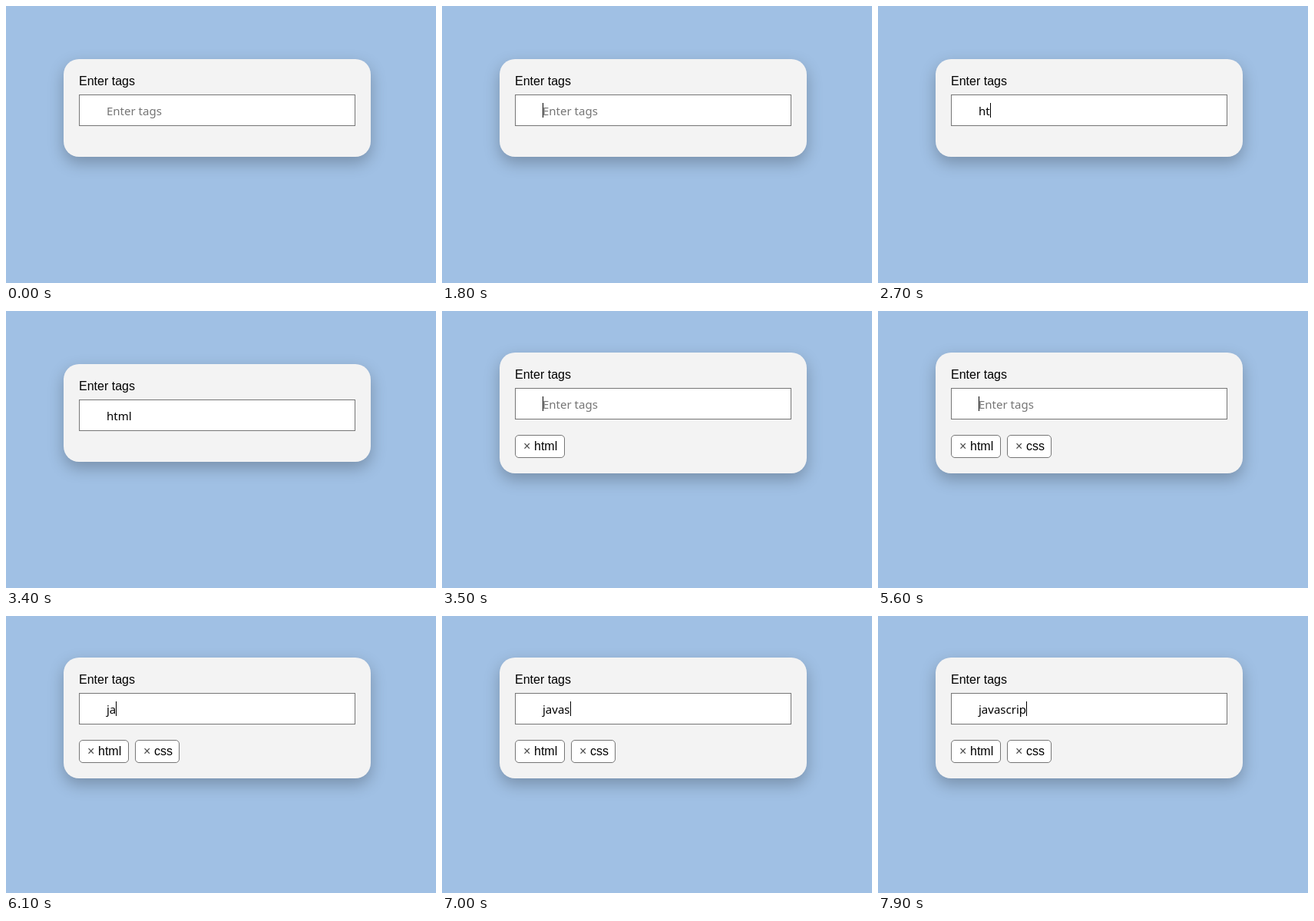
An HTML page that plays this animation: 560x360 px, repeating every 8 s.

```html
<!DOCTYPE html>
<html lang="en">
<head>
<meta charset="utf-8">
<title>Tag input</title>
<style>
  html, body { margin: 0; width: 100%; height: 100%; overflow: hidden; }
  body {
    position: relative;
    background: #a0c0e4;
    font: 16px/18px "Liberation Sans", Arial, sans-serif;
    color: #000;
  }
  .card, .card * { position: absolute; box-sizing: border-box; white-space: pre; }
  .card {
    left: 75px; top: 69px; width: 400px; height: 127px;
    border-radius: 20px;
    background: #f3f3f3;
    box-shadow: 0 8px 20px rgba(0, 0, 0, .25);
  }
  .card.tagged { top: 54px; height: 157px; }
  .label { left: 20px; top: 20px; }
  .field {
    left: 20px; top: 46px; width: 360px; height: 41px;
    border: 1px solid #767676;
    background: #fff;
    font: 15px/20px "Noto Sans", sans-serif;
  }
  .placeholder, .entry { left: 35px; top: 10px; }
  .placeholder { color: #757575; }
  .card .caret {
    position: static; display: inline-block; vertical-align: top;
    width: 1px; height: 19px; background: #000;
  }
  .card .typed { position: static; }
  .tag {
    top: 107px; height: 30px;
    border: 1px solid #767676; border-radius: 5px;
    background: #fff;
  }
  .tag i { left: 10px; top: 5px; font-style: normal; color: #444; }
  .tag b { left: 24px; top: 5px; font-weight: normal; }
  .html { left: 20px; width: 65px; }
  .css { left: 93px; width: 58px; }
</style>
</head>
<body>
<div class="card">
  <span class="label">Enter tags</span>
  <div class="field">
    <span class="placeholder">Enter tags</span>
    <div class="entry"><span class="typed"></span><span class="caret"></span></div>
  </div>
  <div class="tag html"><i>×</i><b>html</b></div>
  <div class="tag css"><i>×</i><b>css</b></div>
</div>
<script>
  const LOOP = 8000;
  const HTML_ADDED = 3500, CSS_ADDED = 4800;

  // [start ms, typed text, caret visible]
  const steps = [
    [0, '', false], [800, '', true], [1300, '', false], [1800, '', true],
    [2400, 'h', true], [2700, 'ht', true], [2900, 'html', true], [3400, 'html', false],
    [HTML_ADDED, '', true],
    [4000, 'c', true], [4100, 'cs', true], [4300, 'css', true], [4600, 'css,', true],
    [CSS_ADDED, '', true], [5100, '', false], [5600, '', true],
    [5800, 'j', true], [6100, 'ja', true], [6700, 'jav', true], [6800, 'java', true],
    [6900, 'javas', true], [7200, 'javasc', true], [7600, 'javascr', true],
    [7700, 'javascri', true], [7800, 'javascrip', true]
  ];

  const find = selector => document.querySelector(selector);
  const card = find('.card'), placeholder = find('.placeholder');
  const typed = find('.typed'), caret = find('.caret');
  const htmlTag = find('.html'), cssTag = find('.css');
  const show = (element, visible) => {
    element.style.visibility = visible ? 'visible' : 'hidden';
  };

  const start = performance.now();

  function draw(now) {
    const time = Math.max(0, now - start) % LOOP;
    const [, text, caretOn] = steps.filter(step => step[0] <= time).pop();
    if (typed.textContent !== text) typed.textContent = text;
    show(placeholder, !text);
    show(caret, caretOn);
    show(htmlTag, time >= HTML_ADDED);
    show(cssTag, time >= CSS_ADDED);
    card.classList.toggle('tagged', time >= HTML_ADDED);
    requestAnimationFrame(draw);
  }
  draw(start);
</script>
</body>
</html>
```
